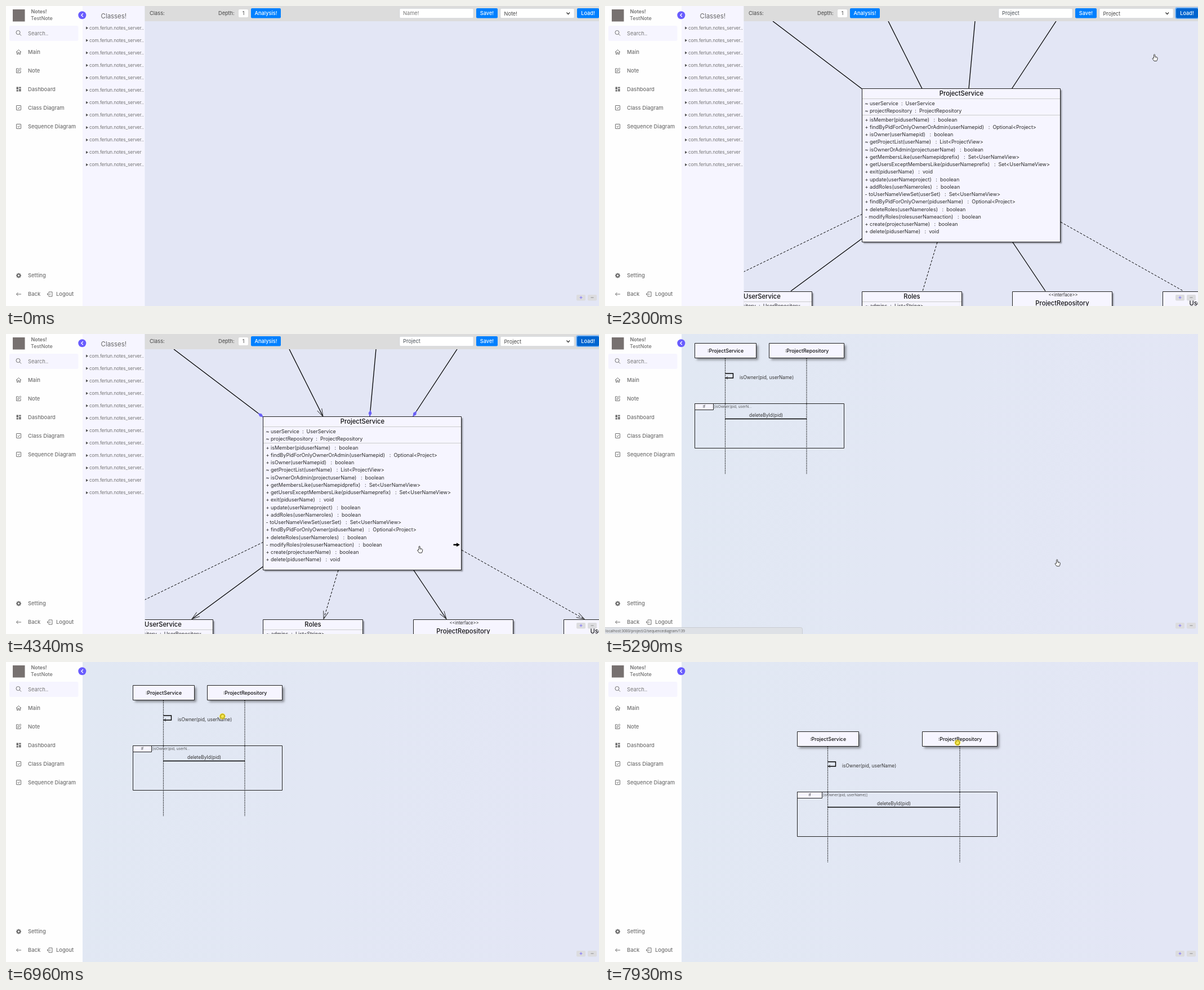
These frames come from a looping animation (1053x532 px, 8000 ms). An HTML page with a canvas:

```html
<!DOCTYPE html>
<html lang="en">
<head>
<meta charset="utf-8">
<title>Notes</title>
<style>
html, body { margin: 0; width: 100%; height: 100%; overflow: hidden; background: #e3e6f5; }
canvas { display: block; width: 1053px; height: 532px; }
</style>
</head>
<body>
<canvas id="stage"></canvas>
<script>
const W = 1053, H = 532, LOOP = 8000;
const canvas = document.getElementById('stage');
const ctx = canvas.getContext('2d');
const dpr = window.devicePixelRatio || 1;
canvas.width = W * dpr;
canvas.height = H * dpr;

const GREY = '#707070', INK = '#2c2c2c', PANEL = '#f6f5ff', BACK = '#e3e6f5', PURPLE = '#695cfe', BLUE = '#0080ff';
const OPEN = 880, CHOSEN = 1410, LOADED = 2020, MARKERS = 2440, PAGE = 5220, GRAB = 6850, DROP = 7300, PULL = 7700;

// Pointer path: time, x, y.
const path = [
  [70, 1041, 512], [210, 1020, 390], [350, 978, 170], [480, 940, 40], [550, 932, 15], [1080, 932, 15],
  [1270, 930, 38], [1400, 930, 38], [1550, 1009, 24], [1820, 1034, 12], [2100, 1034, 12],
  [2300, 976, 85], [2510, 890, 205], [2720, 838, 266], [3130, 838, 266], [3180, 840, 267], [3510, 840, 267],
  [3720, 775, 165], [3960, 725, 300], [4160, 730, 404], [4270, 734, 376], [4340, 734, 376],
  [4600, 780, 396], [4750, 803, 400], [5290, 803, 400], [5640, 710, 330], [5980, 582, 226],
  [6050, 580, 224], [6400, 246, 58], [6750, 318, 71], [6850, 318, 71], [6960, 384, 96],
  [7300, 500, 178], [7560, 536, 143], [7700, 536, 143], [7930, 626, 143]
];
const presses = [[800, 950], [1280, 1405], [1890, 2020], [4820, 4950], [6820, 7330], [7640, 8000]];

function pointer(t) {
  const i = path.findIndex(p => p[0] >= t);
  if (i < 0) return path[path.length - 1].slice(1);
  if (i === 0) return path[0].slice(1);
  const [t0, x0, y0] = path[i - 1], [t1, x1, y1] = path[i];
  const k = (t - t0) / (t1 - t0);
  return [x0 + (x1 - x0) * k, y0 + (y1 - y0) * k];
}

function rect(x, y, w, h, fill, stroke, radius = 0, lineWidth = 1) {
  ctx.beginPath();
  ctx.roundRect(x, y, w, h, radius);
  if (fill) { ctx.fillStyle = fill; ctx.fill(); }
  if (stroke) { ctx.strokeStyle = stroke; ctx.lineWidth = lineWidth; ctx.stroke(); }
}

function disc(x, y, r, fill) {
  ctx.beginPath();
  ctx.arc(x, y, r, 0, Math.PI * 2);
  ctx.fillStyle = fill;
  ctx.fill();
}

function line(points, color = '#000', width = 1, dash = []) {
  ctx.beginPath();
  points.forEach(([x, y]) => ctx.lineTo(x, y));
  ctx.strokeStyle = color;
  ctx.lineWidth = width;
  ctx.setLineDash(dash);
  ctx.stroke();
  ctx.setLineDash([]);
}

function shape(points, fill, stroke, width = 1) {
  ctx.beginPath();
  points.forEach(([x, y]) => ctx.lineTo(x, y));
  ctx.closePath();
  if (fill) { ctx.fillStyle = fill; ctx.fill(); }
  if (stroke) { ctx.strokeStyle = stroke; ctx.lineWidth = width; ctx.stroke(); }
}

// y is the middle of the capitals.
function text(str, x, y, size, color = INK, weight = 400, align = 'left', family = 'Inter') {
  ctx.font = `${weight} ${size}px ${family}, sans-serif`;
  ctx.fillStyle = color;
  ctx.textAlign = align;
  ctx.fillText(str, x, y + size * 0.36);
}

function clipped(x, y, w, h, draw) {
  ctx.save();
  ctx.beginPath();
  ctx.rect(x, y, w, h);
  ctx.clip();
  draw();
  ctx.restore();
}

function shadowBox(x, y, w, h, offset, blur) {
  ctx.save();
  ctx.shadowColor = 'rgba(0,0,0,.4)';
  ctx.shadowOffsetX = ctx.shadowOffsetY = offset * dpr;
  ctx.shadowBlur = blur * dpr;
  rect(x, y, w, h, PANEL);
  ctx.restore();
  rect(x, y, w, h, null, '#222');
}

const icons = {
  home(x, y) {
    line([[x - 4.5, y + .5], [x, y - 4], [x + 4.5, y + .5]], GREY);
    line([[x - 3, y - .5], [x - 3, y + 4], [x - 1, y + 4], [x - 1, y + 1], [x + 1, y + 1], [x + 1, y + 4], [x + 3, y + 4], [x + 3, y - .5]], GREY);
  },
  edit(x, y) {
    line([[x, y - 3.5], [x - 4, y - 3.5], [x - 4, y + 4], [x + 3.5, y + 4], [x + 3.5, y]], GREY);
    shape([[x - 1.8, y + 1.8], [x - 1.5, y - .2], [x + 2.8, y - 4.4], [x + 4.3, y - 3], [x, y + 1.5]], null, GREY);
  },
  grid(x, y) {
    rect(x - 4, y - 4, 3.5, 4.4, GREY);
    rect(x + .6, y - 4, 3.5, 2.6, GREY);
    rect(x - 4, y + 1.4, 3.5, 2.6, GREY);
    rect(x + .6, y - .4, 3.5, 4.4, GREY);
  },
  check(x, y) {
    rect(x - 4, y - 4, 8, 8, null, GREY, .5);
    line([[x - 2, y], [x - .5, y + 1.6], [x + 2.2, y - 1.5]], GREY);
  },
  gear(x, y) {
    for (let i = 0; i < 8; i++) {
      const a = i * Math.PI / 4, c = Math.cos(a), s = Math.sin(a);
      line([[x + 2 * c, y + 2 * s], [x + 4.4 * c, y + 4.4 * s]], GREY, 2);
    }
    disc(x, y, 3.5, GREY);
    disc(x, y, 1.4, '#fefefe');
  },
  back(x, y) {
    line([[x + 4.5, y], [x - 4, y]], GREY);
    line([[x - 1, y - 3], [x - 4, y], [x - 1, y + 3]], GREY);
  },
  logout(x, y) {
    line([[x - 1.5, y - 2], [x - 1.5, y - 4], [x + 4.5, y - 4], [x + 4.5, y + 4], [x - 1.5, y + 4], [x - 1.5, y + 2]], GREY);
    line([[x + 2, y], [x - 4.5, y]], GREY);
    line([[x - 2.5, y - 2], [x - 4.5, y], [x - 2.5, y + 2]], GREY);
  }
};

function sidebar() {
  rect(0, 0, 136, H, '#fefefe');
  rect(12, 6, 21.5, 21.5, '#777170');
  text('Notes!', 44.5, 10, 8.9, GREY, 600);
  text('TestNote', 44, 22, 9, GREY, 500);
  rect(6, 35, 122.5, 27, PANEL, null, 3);
  ctx.beginPath();
  ctx.arc(21.5, 47, 3.5, 0, 7);
  ctx.strokeStyle = GREY;
  ctx.lineWidth = 1;
  ctx.stroke();
  line([[24, 49.5], [27, 52.5]], GREY);
  text('Search..', 39, 48.5, 9.3, '#777');
  [['home', 'Main'], ['edit', 'Note'], ['grid', 'Dashboard'], ['check', 'Class Diagram'], ['check', 'Sequence Diagram']]
    .forEach(([icon, label], i) => {
      const y = 81.5 + 33 * i;
      icons[icon](22.5, y);
      text(label, 39, y, 9.4, GREY, 500);
    });
  icons.gear(22.5, 478);
  text('Setting', 39, 478, 9.4, GREY, 500);
  icons.back(22.5, 511);
  text('Back', 39, 511, 9.4, GREY, 500);
  icons.logout(77.5, 511);
  text('Logout', 89, 511, 9.4, GREY, 500);
}

function toggle() {
  disc(135.3, 16.3, 7, PURPLE);
  line([[136.8, 13.3], [133.8, 16.3], [136.8, 19.3]], '#fff', 1.3);
}

function classPanel() {
  rect(136, 0, 110.5, H, PANEL);
  text('Classes!', 191.3, 17.5, 11.4, '#666', 400, 'center');
  for (let i = 0; i < 12; i++) {
    const y = 39 + 22.05 * i;
    shape([[142, y - 2.5], [146, y], [142, y + 2.5]], '#555');
    text('com.ferlun.notes_server' + (i === 10 ? '' : '..'), 148, y, 8.1, GREY);
  }
}

function button(label, x, w, fill = BLUE, ring) {
  if (ring) rect(x - 1, 3, w + 2, 19, null, '#80b8f5', 3, 2);
  rect(x, 4, w, 17.5, fill, null, 2);
  text(label, x + w / 2, 12.8, 9.2, '#fff', 500, 'center');
}

function topBar(t) {
  const loaded = t >= LOADED;
  rect(246.5, 0, 806.5, 27, '#dcdcdc');
  text('Class:', 255, 12.8, 9.3, '#444');
  text('Depth:', 377, 12.8, 9.2, '#444');
  rect(413, 6, 17, 14, '#fff', null, 2);
  text('1', 421.5, 13, 9, '#444', 400, 'center');
  button('Analysis!', 435, 53);
  rect(699, 4.5, 131, 17, '#fff', '#ced4da', 2, .6);
  text(loaded ? 'Project' : 'Name!', 705, 13, 9.3, loaded ? '#495057' : '#777');
  button('Save!', 835, 38);
  const focused = t >= 810 && t < 1890;
  if (focused) rect(877, 3.5, 133, 18.5, null, '#80b8f5', 2, 2.5);
  rect(878, 4.5, 131, 17, '#fff', '#ced4da', 2, .6);
  text(t >= CHOSEN ? 'Project' : 'Note!', 884.5, 14, 9.2, '#444');
  line([[995.5, 11.5], [998.3, 14.5], [1001, 11.5]], '#333', 1.3);
  const pressed = t >= 1890;
  button('Load!', 1014, 39, pressed ? '#0065d0' : BLUE, pressed);
}

function dropdown(t) {
  ctx.save();
  ctx.shadowColor = 'rgba(0,0,0,.35)';
  ctx.shadowBlur = 3 * dpr;
  ctx.shadowOffsetY = dpr;
  rect(877.5, 22, 132, 29.5, '#fff');
  ctx.restore();
  const second = t > 1180;
  rect(878, second ? 37 : 22.5, 131.5, 14.3, '#2490ee');
  text('Note!', 884.5, 29.2, 9.2, second ? '#444' : '#fff');
  text('Project', 884.5, 43.8, 9.2, second ? '#fff' : '#444');
  rect(877.5, 22, 132, 29.5, null, '#777', 0, .8);
}

function zoomButtons() {
  rect(1013, 512, 16, 10.5, '#dcdcdf', null, 2);
  rect(1033, 512, 16, 10.5, '#dcdcdf', null, 2);
  line([[1018.5, 517], [1023.5, 517]], PURPLE, .8);
  line([[1021, 514.5], [1021, 519.5]], PURPLE, .8);
  line([[1038.5, 517], [1043.5, 517]], '#777', .8);
}

const methods = [
  '+ isMember(piduserName)|boolean',
  '+ findByPidForOnlyOwnerOrAdmin(userNamepid)|Optional<Project>',
  '+ isOwner(userNamepid)|boolean',
  '~ getProjectList(userName)|List<ProjectView>',
  '~ isOwnerOrAdmin(projectuserName)|boolean',
  '+ getMembersLike(userNamepidprefix)|Set<UserNameView>',
  '+ getUsersExceptMembersLike(piduserNameprefix)|Set<UserNameView>',
  '+ exit(piduserName)|void',
  '+ update(userNameproject)|boolean',
  '+ addRoles(userNameroles)|boolean',
  '- toUserNameViewSet(userSet)|Set<UserNameView>',
  '+ findByPidForOnlyOwner(piduserName)|Optional<Project>',
  '+ deleteRoles(userNameroles)|boolean',
  '- modifyRoles(rolesuserNameaction)|boolean',
  '+ create(projectuserName)|boolean',
  '+ delete(piduserName)|void'
];
const rowY = i => 201.5 + 13.23 * i;

// Relations: start, end, dashed, end marker.
const relations = [
  [298, 27, 457, 147.5, 0, 'diamond'], [503, 27, 563, 146.5, 0, 'arrow'],
  [657, 27, 646, 146.5, 0, 'diamond'], [801, 27, 722.5, 146.5, 0, 'diamond'],
  [457, 369, 210, 489, 1, 'arrow'], [457, 412, 330, 505.5, 0, 'arrow'],
  [590, 419, 564, 505.5, 1, 'arrow'], [724, 419, 782, 505.5, 0, 'arrow'],
  [809, 383, 1027, 505.5, 1, 'arrow']
];

function marker(kind, x, y, angle) {
  ctx.save();
  ctx.translate(x, y);
  ctx.rotate(angle);
  if (kind === 'diamond') shape([[0, 0], [-6, -3], [-12, 0], [-6, 3]], '#6a60f5');
  else line([[-14, -4.5], [0, 0], [-14, 4.5]], '#333');
  ctx.restore();
}

function classDiagram(t, [px, py]) {
  for (const [x0, y0, x1, y1, dashed, kind] of relations) {
    line([[x0, y0], [x1, y1]], '#000', dashed ? 1 : 1.3, dashed ? [4, 2.6] : []);
    if (t >= MARKERS) marker(kind, x1, y1, Math.atan2(y1 - y0, x1 - x0));
  }
  shadowBox(456.5, 146.5, 352, 272, 2, 2);
  text('ProjectService', 633, 155.2, 11.2, '#111', 500, 'center');
  line([[457, 164.5], [808, 164.5]], '#ccc');
  text('~ userService  :  UserService', 461.5, 172.5, 9);
  text('~ projectRepository  :  ProjectRepository', 461.5, 185.7, 9);
  line([[457, 193.5], [808, 193.5]], '#ccc');
  methods.forEach((m, i) => text(m.replace('|', '   :  '), 461.5, rowY(i), 9.02));

  [[190.5, 'UserService'], [456.5, 'Roles'], [723.5, 'ProjectRepository', true], [990.5, 'UserRepository', true]]
    .forEach(([x, name, isInterface]) => {
      shadowBox(x, 506.5, 177, 60, 2, 2);
      if (isInterface) text('<<interface>>', x + 90, 512.5, 7.6, INK, 400, 'center');
      else line([[x + .5, 524.5], [x + 176.5, 524.5]], '#ccc');
      text(name, x + 88.5, isInterface ? 527.2 : 515.2, 11.2, '#111', 500, 'center');
    });
  text('~ userRepository  :  UserRepository', 195, 532, 9);
  text('~ admins  :  List<String>', 462, 532, 9);

  const row = Math.round((py - rowY(0)) / 13.23);
  if (t >= 3510 && px > 457 && px < 809 && row >= 0 && row < methods.length) {
    const y = rowY(row) + .2;
    line([[794.5, y], [801, y]], '#000', 2.6);
    shape([[800, y - 3.5], [806, y], [800, y + 3.5]], '#000');
  }
}

function truncate(str, width) {
  if (ctx.measureText(str).width <= width) return str;
  while (ctx.measureText(str + '...').width > width) str = str.slice(0, -1);
  return str + '...';
}

function sequenceDiagram(dx, dy, stretch) {
  ctx.save();
  ctx.translate(dx, dy);
  const left = 213.5, right = 358 + stretch, width = 265 + stretch;
  const tab = Math.round(width / 8), condition = '[isOwner(pid, userName)]';
  shadowBox(159.5, 16.5, 109, 26, 3, 4);
  shadowBox(291.5 + stretch, 16.5, 133, 26, 3, 4);
  text(':ProjectService', 214, 29.5, 8.8, '#111', 500, 'center');
  text(':ProjectRepository', 358.5 + stretch, 29.5, 8.8, '#111', 500, 'center');
  rect(159.5, 123.5, width, 79, null, '#222');
  rect(159.5, 123.5, tab, 11, PANEL, '#222');
  text('If', 159.5 + tab / 2, 129, 6.6, INK, 400, 'center');
  for (const x of [left, right]) line([[x, 43], [x, 248]], '#000', 1.2, [1.5, 1.5]);
  ctx.font = '300 6.6px Inter, sans-serif';
  text(truncate(condition, width * .265), 160.5 + tab, 128.2, 6.6, '#333', 300);
  line([[left, 70], [227.5, 70], [227.5, 78], [left, 78]], '#000', 1.4);
  line([[218, 75.5], [214.5, 78], [218, 80]], '#333', .9);
  text('isOwner(pid, userName)', 239, 77, 8.35, '#333');
  text('deleteById(pid)', (left + right) / 2 + .3, 144, 8.3, '#333', 400, 'center');
  line([[left, 150.5], [right, 150.5]], '#000', 1.4);
  ctx.restore();
}

function pageBackground() {
  const tint = ctx.createLinearGradient(136, 0, W, 200);
  tint.addColorStop(0, '#e1e8f3');
  tint.addColorStop(1, BACK);
  rect(136, 0, W - 136, H, tint);
}

function statusBar() {
  rect(-1, 520.5, 351.5, 13, '#dee1e6', '#c4c7cc', [0, 3, 0, 0], .8);
  text('localhost:3000/project/2/sequencediagram/139', 1, 526.8, 6.4, '#555', 400, 'left', 'Open Sans');
}

function cursor(t, x, y) {
  const grabbing = (t >= 6820 && t < 7330) || t >= 7640;
  const pressed = presses.some(([a, b]) => t >= a && t < b);
  const at = pts => pts.map(([a, b]) => [x + a, y + b]);
  if (pressed && !grabbing) disc(x + 1, y + .8, 7, 'rgba(238,232,70,.6)');
  ctx.lineJoin = 'round';
  if (grabbing) {
    disc(x, y, 5.2, '#f0dc28');
    shape(at([[-3, -1], [-2, -3], [0, -3.5], [2, -3], [3.6, -1.5], [3.4, 1], [2, 3.5], [-1.5, 3.5], [-3.5, 1.5]]), '#f7e84a', '#8a7a18', .9);
  } else if (t < 1680) {
    const points = at([[0, 0], [0, 8.5], [2, 6.8], [3.3, 9.8], [4.7, 9.2], [3.4, 6.3], [6, 6.1]]);
    shape(points, pressed ? '#f4ee40' : '#fff', '#222', .8);
  } else {
    const points = at([[-1, 7], [-1, .8], [0, 0], [1, .8], [1, 4.3], [4.6, 5.2], [5.6, 6.5], [5, 10], [4, 12], [-.5, 12], [-3.6, 7.8], [-3, 6.8]]);
    shape(points, pressed ? '#f4ee40' : '#fff', '#222', .9);
    line(at([[2.4, 5], [2.4, 7]]), '#222', .6);
  }
  ctx.lineJoin = 'miter';
}

function draw(t) {
  const [px, py] = pointer(t);
  ctx.setTransform(dpr, 0, 0, dpr, 0, 0);
  rect(0, 0, W, H, BACK);
  if (t < PAGE) {
    if (t >= LOADED) clipped(246.5, 27, 806.5, 505, () => classDiagram(t, [px, py]));
    classPanel();
    topBar(t);
    if (t >= OPEN && t < CHOSEN) dropdown(t);
  } else {
    pageBackground();
    const [gx, gy] = t < GRAB ? [318, 71] : pointer(Math.min(t, DROP));
    sequenceDiagram(Math.round(gx - 318), Math.round(gy - 71), t < PULL ? 0 : Math.round(px - 536));
  }
  sidebar();
  toggle();
  zoomButtons();
  if (t >= 4720 && t < 5430) statusBar();
  if (t >= 70) cursor(t, px, py);
}

function tick(now) {
  draw(now % LOOP);
  requestAnimationFrame(tick);
}
requestAnimationFrame(tick);
</script>
</body>
</html>
```
